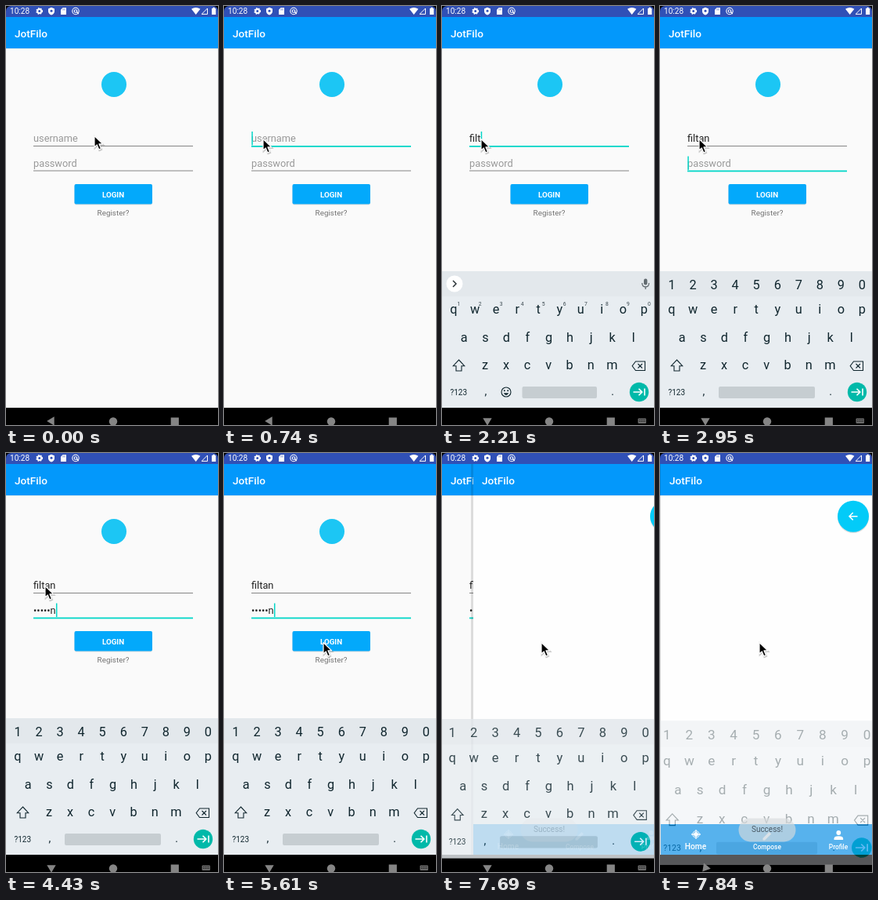
Animation of 271x534 px, one loop 7.99 s. Source, as an HTML page:

```html
<!DOCTYPE html>
<html lang="en">
<head>
<meta charset="utf-8">
<title>JotFilo login</title>
<style>
html, body { margin: 0; width: 100%; height: 100%; overflow: hidden; background: #fafafa; }
svg { display: block; width: 271px; height: 534px; font-family: Roboto, sans-serif; }
.mid { text-anchor: middle; }
.line { fill: none; stroke-width: 1.3; }
</style>
</head>
<body>
<svg id="stage" viewBox="0 0 271 534" xmlns="http://www.w3.org/2000/svg"></svg>
<script>
const LOOP = 7990, STEP = 146;
const APP = 'JotFilo', USER = 'filtan';
const TEAL = '#03d6c8';
const userKeys = [1480, 1770, 1920, 2210, 2360, 2510];
const passKeys = [3400, 3700, 3840, 4140, 4290, 4430];
const words = [['f', 'for', 'from'], ['fi', 'first', 'find'], ['fil', 'film', 'file'],
  ['filt', 'filter', 'filth'], ['filta', 'filter', 'fiesta'], ['filtan', 'fountain', 'filling']];

const text = (x, y, size, fill, s, extra = '') =>
  `<text x="${x}" y="${y}" font-size="${size}" fill="${fill}" ${extra}>${s}</text>`;
const mid = (x, y, size, fill, s, extra = '') => text(x, y, size, fill, s, 'class="mid" ' + extra);
const rect = (x, y, w, h, fill, extra = '') =>
  `<rect x="${x}" y="${y}" width="${w}" height="${h}" fill="${fill}" ${extra}/>`;
const disc = (x, y, r, fill, extra = '') => `<circle cx="${x}" cy="${y}" r="${r}" fill="${fill}" ${extra}/>`;
const path = (d, fill, extra = '') => `<path d="${d}" fill="${fill}" ${extra}/>`;
const line = (d, color, extra = '') => `<path class="line" d="${d}" stroke="${color}" ${extra}/>`;
const group = (id, body, extra = '') => `<g id="${id}" ${extra}>${body}</g>`;
const row = (chars, x, y, size, fill) =>
  [...chars].map((c, i) => mid(x + i * 27.05, y, size, fill, c)).join('');

function statusBar() {
  const w = '#fff';
  return rect(0, 0, 271, 14, '#3050b6')
    + path('M0 0h7q-7 0-7 7zM271 0h-7q7 0 7 7z', '#000')
    + text(5, 10, 10.1, w, '10:28')
    + disc(42.7, 6.5, 2.5, 'none', 'stroke="#fff" stroke-width="2"')
    + disc(42.7, 6.5, 3.7, 'none', 'stroke="#fff" stroke-width="1.4" stroke-dasharray="1.6 1.46"')
    + path('M58 1.8l4 1.6v3q0 3.6-4 5q-4-1.4-4-5v-3z', w)
    + disc(58, 6.3, 1.5, '#3050b6')
    + path('M72.5 2.2h4.5v8.8h-7v-6.2z', w)
    + line('M73 3.5v2M75 3.5v2', '#3050b6', 'style="stroke-width:.7"')
    + disc(89, 6.5, 4.2, 'none', 'stroke="#fff" stroke-width="1.1"')
    + disc(89, 6.5, 1.8, 'none', 'stroke="#fff" stroke-width="1.1"')
    + line('M90.5 7.5l2.2 2.6', w)
    + path('M237 3.8q5.7-3.8 11.4 0l-5.7 7.2z', w)
    + line('M257.5 3v7.4h-7.4z', w, 'style="stroke-width:1"')
    + path('M263 3h1.5v-1.2h2.2v1.2h1.5v8h-5.2z', w);
}

const appBar = () => rect(0, 14, 271, 40, '#0398fb')
  + rect(0, 54, 271, 1, '#000', 'opacity=".06"')
  + text(11, 40, 13.6, '#fff', APP, 'font-weight="500"');

function login() {
  return rect(0, 0, 271, 534, '#fafafa') + appBar()
    + disc(138, 100, 16, '#1cc6f4')
    + text(35, 173, 12.8, '#999', 'username', 'id="userHint"')
    + text(35, 173, 12.8, '#222', '', 'id="user"')
    + text(35, 205, 12.8, '#999', 'password', 'id="passHint"')
    + text(35, 205, 12.8, '#222', '', 'id="pass"')
    + rect(35, 178, 204, 1, '#858585', 'id="userLine"')
    + rect(35, 209.5, 204, 1, '#858585', 'id="passLine"')
    + rect(35, 160, 1.5, 17.5, TEAL, 'id="caret"')
    + rect(87.5, 228, 99.5, 25.5, '#000', 'rx="2" opacity=".12"')
    + rect(87.5, 227, 99.5, 25.5, '#03a9fb', 'rx="2"')
    + group('press', disc(130, 243, 0, '#fff', 'id="ripple" opacity=".3"'), 'clip-path="url(#button)"')
    + mid(137, 243.6, 9.8, '#fff', 'LOGIN', 'font-weight="700"')
    + mid(137, 267.3, 9.9, '#757575', 'Register?');
}

function keyboard() {
  const ink = '#10262e', gray = '#626b70';
  const tools = disc(52, 353, 3.8, 'none', `stroke="${gray}" stroke-width="1.4"`)
    + line('M55 356l4 4', gray, 'style="stroke-width:1.6"')
    + line('M87.5 348.500h9.500v7l-4 4h-5.500z', gray)
    + disc(90.3, 352, .9, gray) + disc(94, 352, .9, gray)
    + line('M89.5 354.5q2.500 2.500 5 0', gray)
    + mid(131.5, 357.4, 9.2, gray, 'GIF', 'font-weight="900"')
    + rect(166.5, 347.5, 8, 9.5, gray, 'rx="1"')
    + mid(170.5, 355, 7, '#e3e8ec', 'G', 'font-weight="700"')
    + line('M175 350.5h3.5v9.5h-7.5l-1-2.5M174 354h4M176.5 354l-2.5 4', gray, 'style="stroke-width:1"')
    + rect(196, 346, .8, 16, '#d3d9dd')
    + [217, 221.5, 226].map(x => disc(x, 354, 1.3, gray)).join('');
  const strip = disc(16, 354, 10.5, '#fff')
    + line('M18 350l-4 4l4 4', '#2c3438', 'id="chevron" style="stroke-width:1.5"')
    + group('tools', tools)
    + group('hints', [67, 137, 203].map(x => mid(x, 358, 11.5, '#37434a', '', 'class="mid hint"')).join(''))
    + rect(258, 347.5, 4.4, 8, gray, 'rx="2.2"')
    + line('M255.8 353q0 5 4.4 5t4.4-5M260.2 358v3', gray);
  return rect(0, 338, 271, 175, '#e8edf1') + rect(0, 338, 271, 32, '#e3e8ec')
    + group('strip', strip)
    + group('digits', row('1234567890', 15, 360.5, 16.3, ink))
    + group('small', row('1234567890', 21.5, 382, 6.8, '#3a484f'))
    + row('qwertyuiop', 15, 392, 16.3, ink)
    + row('asdfghjkl', 28.3, 427.5, 16.3, ink)
    + row('zxcvbnm', 55, 462.5, 16.3, ink)
    + line('M21.5 451l7.2 7.7h-3.7v6.3h-7v-6.3h-3.7z', ink, 'style="stroke-width:1.1"')
    + line('M247.5 453h12v11.5h-12l-4.3-5.75zM250.5 456l5.5 5.5M256 456l-5.5 5.5', ink, 'style="stroke-width:1.1"')
    + mid(21.3, 496, 10, ink, '?123') + mid(56, 496, 14, ink, ',') + mid(218, 496, 14, ink, '.')
    + group('emoji', disc(82, 492, 6, 'none', `stroke="${ink}" stroke-width="1.1"`)
      + disc(79.8, 490.3, 1, ink) + disc(84.2, 490.3, 1, ink) + path('M78.7 493.3h6.6q-3.3 5.2-6.6 0z', ink))
    + rect(102.5, 485, 95.5, 15, '#c6cdd1', 'rx="2" id="space"')
    + disc(252, 492, 12.2, '#00b9a9')
    + line('M244.5 492h11M251.5 487.7l4.3 4.3l-4.3 4.3M259 487.5v9', '#fff', 'style="stroke-width:1.6"');
}

function home() {
  return rect(-3, 14, 3, 498, '#000', 'opacity=".12"')
    + rect(0, 14, 271, 498, '#fefefe') + appBar()
    + disc(246, 82, 20, '#000', 'opacity=".13"') + disc(246, 80.7, 20, '#03cbf8')
    + line('M251.5 80.7h-10.5M245.7 76l-4.7 4.7l4.7 4.7', '#fff', 'style="stroke-width:1.5"')
    + rect(0, 473, 271, 39, '#0390ec');
}

const tabs = () => disc(45, 486, 3, '#fff', 'opacity=".85"')
  + disc(45, 486, 4.3, 'none', 'stroke="#fff" opacity=".85"')
  + line('M45 480v12M39 486h12', '#fff', 'opacity=".85"')
  + path('M130.5 493.5v-2.6l8-8l2.6 2.6l-8 8z', '#fff', 'opacity=".8"')
  + disc(227.3, 484, 2.9, '#fff') + path('M221.5 493v-1.5q0-3.3 5.8-3.3t5.8 3.3v1.5z', '#fff')
  + mid(44.5, 505, 10.2, '#fff', 'Home', 'font-weight="500"')
  + mid(136, 505, 8.4, '#fff', 'Compose', 'font-weight="500"')
  + mid(227, 505, 8.4, '#fff', 'Profile', 'font-weight="500"');

const navIcons = () => path('M-5.8 0l9.5-5.7v11.4z', '#858585', 'id="back"')
  + disc(137, 529.5, 5.2, '#858585') + rect(210.7, 524.5, 10.2, 10.2, '#858585')
  + group('switcher', rect(250.5, 525.5, 10.5, 6.5, '#6a6a6a', 'rx="1"')
    + line('M252 527.5h8M252 529.5h8', '#111', 'stroke-dasharray="1 .8" style="stroke-width:.9"'));

const stage = document.getElementById('stage');
stage.innerHTML = `<defs>
  <clipPath id="button">${rect(87.5, 227, 99.5, 25.5, '#000', 'rx="2"')}</clipPath>
  <clipPath id="above">${rect(0, 0, 271, 512, '#000')}</clipPath></defs>`
  + login() + group('home', home())
  + rect(0, 512, 271, 22, '#000') + statusBar()
  + group('board', group('keys', keyboard()))
  + group('tabs', tabs())
  + group('toast', rect(100.5, 465.5, 73, 30, '#d9dcde', 'rx="15" opacity=".65"')
    + mid(137, 483, 10, '#4a5a66', 'Success!'))
  + navIcons();
const arrow = 'M0 0v14.5l3.3-3.1l2.5 6l2.7-1.1l-2.5-5.9h4.7z';
stage.innerHTML += group('pointer',
  path(arrow, '#000', 'transform="translate(.6 1.2)" opacity=".2" stroke="#000" stroke-width="2"')
  + path(arrow, '#000', 'stroke="#fff" stroke-width="1.2" stroke-linejoin="round"'));

const $ = id => document.getElementById(id);
const set = (id, name, value) => $(id).setAttribute(name, value);
const show = (id, on) => set(id, 'visibility', on ? 'visible' : 'hidden');
const display = (id, on) => set(id, 'display', on ? 'inline' : 'none');
const count = (times, t) => times.filter(k => t >= k).length;
const within = (t, a, b) => t >= a && t < b;
const smooth = p => p * p * (3 - 2 * p);
const progress = (t, start, steps) =>
  Math.max(0, Math.min(1, (Math.floor((t - start) / STEP) + 1) / steps));

function placePointer(t) {
  const a = smooth(progress(t, 150, 4)), p = progress(t, 4880, 6);
  const swing = p ** 4 * (1 - p), b = smooth(p);
  const x = 113 - 63 * a + 77 * (b + 3.4 * swing);
  const y = 165.5 + 4 * a + 72 * (b + .6 * swing);
  set('pointer', 'transform', `translate(${x} ${y})`);
}

function placeKeyboard(t) {
  const up = t >= 885, leaving = t >= 7690, last = t >= 7840;
  const scale = last ? 1.05 : leaving ? 1.015 : 1;
  const drop = t < 1030 ? 75 : 0;
  display('board', up);
  set('board', 'opacity', last ? .37 : leaving ? .82 : 1);
  set('board', 'clip-path', leaving ? 'none' : 'url(#above)');
  set('keys', 'transform', `translate(136.5 ${272 + drop}) scale(${scale}) translate(-136.5 -272)`);

  const secret = t >= 2950, typing = t >= 1480;
  for (const id of ['strip', 'small', 'emoji']) display(id, !secret);
  display('digits', secret);
  display('tools', !typing);
  display('hints', typing);
  set('chevron', 'transform', typing ? 'rotate(180 16 354)' : '');
  set('space', 'x', secret ? 75 : 102.5);
  set('space', 'width', secret ? 123 : 95.5);
  const list = words[count(userKeys, t) - 1] || ['', '', ''];
  document.querySelectorAll('.hint').forEach((e, i) => e.textContent = list[i]);

  set('back', 'transform', `translate(58 529) rotate(${last ? -50 : up ? -90 : 0})`);
  show('switcher', up && !last);
}

function placeFields(t) {
  const typed = count(userKeys, t), hidden = count(passKeys, t);
  $('user').textContent = USER.slice(0, typed);
  $('pass').textContent = t >= 5910 ? '•'.repeat(hidden)
    : hidden ? '•'.repeat(hidden - 1) + USER[hidden - 1] : '';
  show('userHint', !typed);
  show('passHint', !hidden);

  const inUser = within(t, 740, 2950), inPass = t >= 2950;
  for (const [id, on] of [['userLine', inUser], ['passLine', inPass]]) {
    set(id, 'fill', on ? TEAL : '#858585');
    set(id, 'height', on ? 1.8 : 1);
  }
  const off = within(t, 1180, 1480) || within(t, 4880, 5460) || within(t, 5910, 6490) || t >= 6940;
  show('caret', (inUser || inPass) && !off);
  set('caret', 'x', 35.3 + $(inPass ? 'pass' : 'user').getComputedTextLength());
  set('caret', 'y', inPass ? 191.5 : 160);
  set('ripple', 'r', within(t, 5910, 6050) ? 35 : within(t, 6050, 6200) ? 80 : 0);
}

function placeHome(t) {
  const on = t >= 7690, last = t >= 7840, x = last ? 1 : 40;
  for (const id of ['home', 'tabs', 'toast']) show(id, on);
  for (const id of ['home', 'tabs']) set(id, 'transform', `translate(${x} 0)`);
  set('tabs', 'opacity', last ? 1 : .2);
  set('toast', 'opacity', last ? 1 : .3);
}

function draw(ms) {
  const t = ms % LOOP + 5;
  placePointer(t);
  placeKeyboard(t);
  placeFields(t);
  placeHome(t);
}

const start = performance.now();
function tick(now) {
  draw(Math.max(0, now - start));
  requestAnimationFrame(tick);
}
draw(0);
requestAnimationFrame(tick);
</script>
</body>
</html>
```
